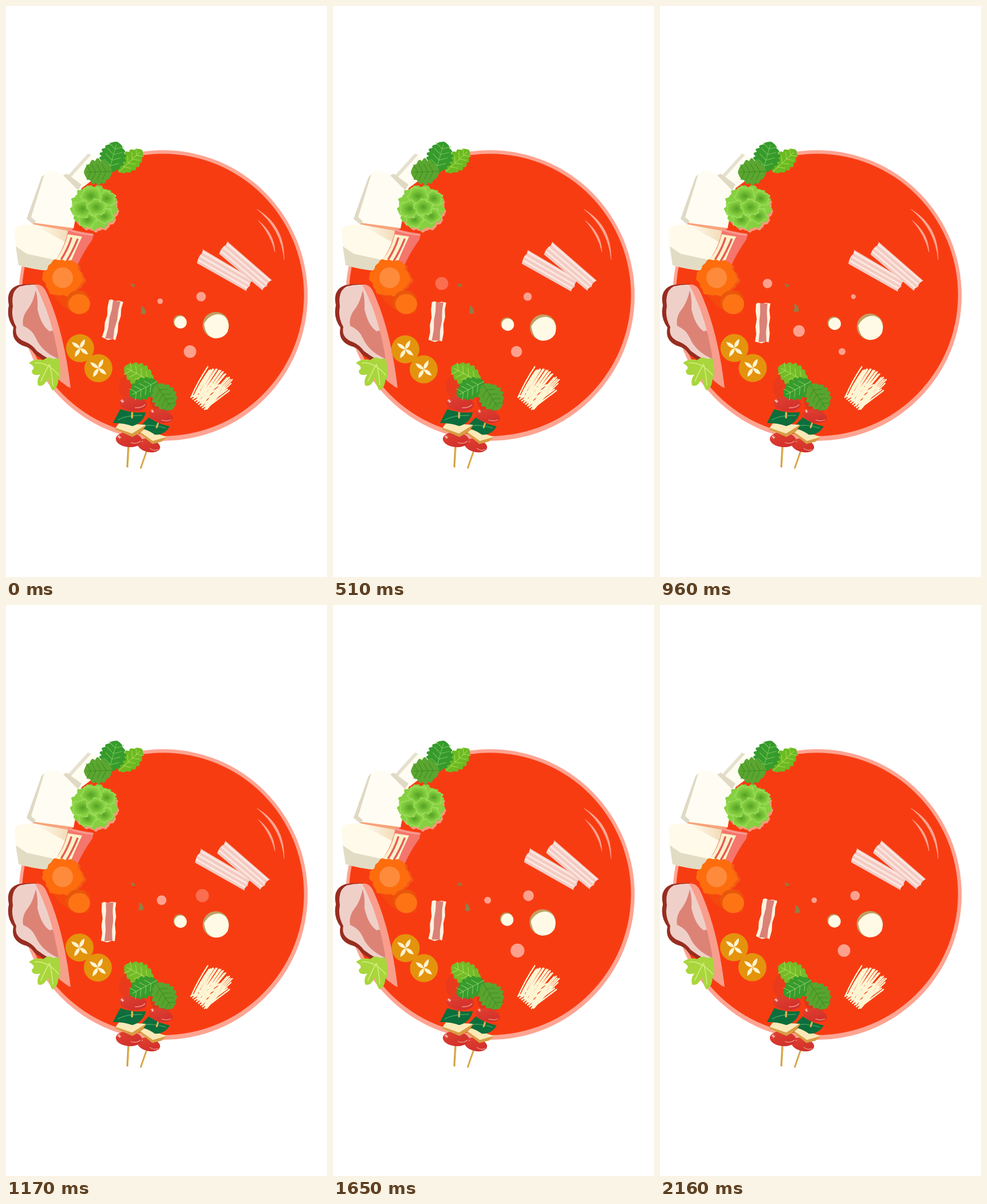
An HTML page for the animation above (2190 ms loop, 561 by 998 pixels).

```html
<!DOCTYPE html>
<html lang="en">
<head>
<meta charset="utf-8">
<title>Hot pot</title>
<style>
html, body { margin: 0; width: 100%; height: 100%; overflow: hidden; background: #fff; }
svg { display: block; width: 100vw; height: 100vh; }
</style>
</head>
<body>
<svg viewBox="0 0 561 998" fill="none" stroke-linejoin="round" stroke-linecap="round">
  <defs>
    <radialGradient id="frill">
      <stop offset="0" stop-color="#559f25"/><stop offset=".55" stop-color="#78c437"/><stop offset="1" stop-color="#92da4e"/>
    </radialGradient>
    <linearGradient id="tomato" x2="1" y2="1">
      <stop offset="0" stop-color="#e2412f"/><stop offset="1" stop-color="#cd2c2b"/>
    </linearGradient>
    <linearGradient id="tan">
      <stop offset="0" stop-color="#fffdf3"/><stop offset="1" stop-color="#f2dbb6"/>
    </linearGradient>
    <path id="petal" d="M0 0Q8-6.500 18 0Q8 6.500 0 0" fill="#fdf3d0"/>
    <g id="cap">
      <circle r="24.500" fill="#e4930d"/>
      <use href="#petal" transform="rotate(38)"/><use href="#petal" transform="rotate(121)"/>
      <use href="#petal" transform="rotate(216)"/><use href="#petal" transform="rotate(298)"/>
    </g>
    <g id="rasher">
      <path d="M0-13Q5-10 2-4Q0 3 4 13L103 12Q100 7 104 2Q100-5 104-12Z" fill="#f3cbc3"/>
      <path d="M2-9.500L102-9M2-1L101-1M3 7L102 6.500" stroke="#fbe8e1" stroke-width="3.200" stroke-linecap="butt"/>
    </g>
  </defs>

  <ellipse cx="274.700" cy="506" rx="252.500" ry="254" fill="#fda492"/>
  <ellipse cx="274.300" cy="505" rx="246.500" ry="246.800" fill="#f83c12"/>
  <path d="M439 355.500Q487 384 486 443Q481 390 439 355.500M441 375Q469 397 470 430Q463 400 441 375" fill="#fda794" stroke="#fda794" stroke-width=".6"/>

  <!-- tofu -->
  <path d="M104 301L143 258L160 264L150 305L130 320Z" fill="#fffdf2"/>
  <path d="M104 301L143 258L149 260L110 303Z" fill="#e6e0ce"/>
  <path d="M74 287L103 295L132 318L118 389L48 381L36 372L62 299Z" fill="#fffdf3"/>
  <path d="M62 299L36 372L48 382L52 376L44 369L67 294Z" fill="#dfd9c5"/>
  <path d="M100 296L106 293L132 312L126 322Z" fill="#e0dac5"/>
  <path d="M49 379L117 388L113 394L48 383Z" fill="#f8a37a"/>
  <path d="M17 386Q30 381 50 382L110 395L104 428L76 463Q45 460 22 453Q17 420 15 395Z" fill="#fffaea"/>
  <path d="M48 382L110 393L106 414Z" fill="url(#tan)"/>
  <path d="M17 420L36 433L82 443L75 463Q45 460 22 453Z" fill="#e2dcc4"/>

  <!-- crab stick -->
  <path d="M109 389Q130 395 153 398L151 408Q135 430 124 455L85 446Q104 420 109 389" fill="#f4766c"/>
  <path d="M108 399L133 403Q120 430 112 451L87 443Q102 425 108 399" fill="#faf2ca"/>
  <path d="M114 406Q108 425 97 442M125 408Q117 428 106 446" stroke="#e95c55" stroke-width="3.500"/>
  <path d="M109 391Q130 398 151 400" stroke="#f99b91" stroke-width="3"/>

  <g id="greens"></g>
  <g id="carrots"></g>

  <!-- meat -->
  <path d="M21 488Q42 484 59 488Q84 540 103 630Q72 626 50 608Q42 596 30 594Q8 585 13 562Q0 545 5 523Q-1 496 21 488" fill="#972d20"/>
  <path d="M24 490Q43 485 59 488Q84 540 102 629Q76 620 54 603Q46 592 34 587Q14 580 18 561Q8 543 12 525Q8 498 24 490" fill="#efd0c9"/>
  <path d="M52 497Q47 519 38 530Q27 544 30 559Q46 566 52 580Q62 604 92 617L88 582Q83 562 77 569Q62 560 55 530Q56 510 52 497" fill="#dc8376"/>
  <path d="M51 487Q64 485 71 501Q101 567 113 668L91 652Q98 640 89 600Q78 538 51 487" fill="#f99d8d"/>
  <path d="M40 624Q51 615 65 619Q73 611 83 617Q95 613 96 624Q102 638 107 655Q96 658 92 650Q91 668 81 672Q74 661 74 650Q65 668 56 663Q53 653 60 644Q45 648 45 637Q54 632 40 624" fill="#a9d63c"/>
  <path d="M92 613Q101 635 110 667L94 655Q97 637 92 613" fill="#f99d8d"/>
  <path d="M51 624Q72 622 92 645M61 656Q70 636 76 626M82 663Q80 642 77 628" stroke="#d6ee83" stroke-width="1.500"/>

  <!-- moving pieces -->
  <g id="bubbles" fill="#fda18e"></g>
  <g id="bacon">
    <use href="#rasher" transform="translate(337 436.500) rotate(30)"/>
    <use href="#rasher" transform="translate(378 421) rotate(40.500)"/>
  </g>
  <path d="M218 485L224 486L226 491L219 490.500Z" fill="#94793f"/>
  <path id="herb" d="M-3-7Q3-5 5 4L4 7L-4 7Q-2 0-3-7" fill="#8f8048"/>
  <g id="pork">
    <path d="M167 521L171 519L177 521L184 519L192 520L190.500 532L192 545L190 558L191.500 573L190 588L185 587L177 590L166 587L168 574L166.500 561L168.500 548L166.500 534Z" fill="#fdf2df"/>
    <path d="M174 521L187 520L186 535L187 552L185 570L186 587L172 588L174 569L173 552L174.500 537Z" fill="#db8177"/>
  </g>
  <g id="smallCap">
    <circle cx="-1" cy="-1" r="11.200" fill="#b99a58"/><circle r="10.800" cx=".6" cy=".6" fill="#fffae6"/>
  </g>
  <g id="bigCap">
    <circle cx="-.5" cy="-1" r="23" fill="#c0a064"/><path d="M-21-3Q-17-12-8-17Q6-24 17-14Q25-3 20 11Q12 23-2 22Q-18 20-21-3" fill="#fffae6"/>
  </g>
  <g id="shiitake">
    <use href="#cap" x="130" y="597.500"/><use href="#cap" x="162" y="632.500"/>
  </g>

  <g id="enoki" stroke="#fdf5d3" stroke-width="2.300"></g>
  <g id="skewers"></g>
</svg>

<script>
const el = id => document.getElementById(id);
const TAU = Math.PI * 2;

const path = (d, fill, extra = '') => `<path d="${d}" fill="${fill}" ${extra}/>`;
const line = (d, color, w) => `<path d="${d}" stroke="${color}" stroke-width="${w}"/>`;
const disc = (x, y, rx, ry, fill, turn = 0) =>
  `<ellipse cx="${x}" cy="${y}" rx="${rx}" ry="${ry}" fill="${fill}" transform="rotate(${turn} ${x} ${y})"/>`;
const poly = pts => 'M' + pts.map(p => p.map(v => v.toFixed(1)).join(' ')).join('L') + 'Z';

// Closed outline whose radius ripples
function ripple(x, y, rx, ry, waves, depth, phase = 0) {
  const pts = [];
  for (let i = 0; i < 140; i++) {
    const a = i / 140 * TAU;
    const k = 1 + depth * (Math.sin(a * waves + phase) + .5 * Math.sin(a * (waves * 2 + 3)));
    pts.push([x + rx * k * Math.cos(a), y + ry * k * Math.sin(a)]);
  }
  return poly(pts);
}

// Scalloped leaf growing from its stem at (x, y)
function leaf(x, y, angle, len, half, teeth, fill, vein) {
  const side = s => Array.from({ length: 61 }, (_, i) => {
    const u = i / 60, tooth = Math.abs(Math.sin(u * teeth * Math.PI));
    return [u * len, s * half * Math.pow(Math.sin(Math.PI * u), .65) * (.8 + .2 * tooth)];
  });
  let veins = `M0 0L${len * .9} 0`;
  for (let u = .22; u < .8; u += .18)
    for (const s of [-1, 1])
      veins += `M${len * u} 0L${len * (u + .14)} ${s * half * .55}`;
  return `<g transform="translate(${x} ${y}) rotate(${angle})">` +
    path(poly([...side(1), ...side(-1).reverse()]), fill) + line(veins, vein, 1) + '</g>';
}

function lettuce() {
  const puffs = [[172, 366, 15], [142, 374, 15], [176, 337, 15], [149, 331, 17], [133, 355, 17], [158, 352, 16]];
  return path(ripple(157, 356, 39, 38, 13, .04), '#f49a7d') +
    path(ripple(154, 352, 40, 38, 13, .05), '#86d041') +
    puffs.map(([x, y, r], i) =>
      path(ripple(x, y, r, r * .85, 5, .13, i * 2), 'url(#frill)', 'stroke="#b0e672" stroke-width=".9"')).join('');
}

el('greens').innerHTML =
  leaf(197, 290, -43, 56, 18, 6, '#6cba22', '#a5dc55') +
  leaf(179, 291, -74, 56, 24, 7, '#369b2c', '#7cc65a') +
  leaf(186, 289, 178, 50, 24, 5, '#5aa630', '#3f8a24') +
  lettuce();

el('carrots').innerHTML =
  path('M83 505Q100 492 138 498L147 508L145 537Q105 541 83 505', '#f5480c') +
  path(ripple(104, 477, 33, 31, 6, .07, 1), '#f35a15') +
  path(ripple(99, 475, 34, 32, 6, .06, 1), '#fd6d0d') +
  disc(99, 475, 18, 18, '#fe8b3c') +
  disc(125, 517, 20, 20, '#e9570b') + disc(128, 521, 19, 17.5, '#fe7415');

// Loose stems fan upwards, shorter ones cross the lower half
let seed = 7;
const rand = () => (seed = seed * 16807 % 2147483647) / 2147483647;
let stems = '';
for (let i = 0; i < 22; i++) {
  const u = i / 21;
  const x1 = 324 + u * 25 + rand() * 4, y1 = 680 + u * 23 + rand() * 3;
  const x2 = 352 + u * 43 + rand() * 2, y2 = 628 + u * u * 24 + rand() * 12;
  stems += `M${x1} ${y1}Q${(x1 + x2) / 2 - 3} ${(y1 + y2) / 2} ${x2} ${y2}`;
}
for (let i = 0; i < 8; i++)
  stems += `M${323 + i * 3.4} ${684 + i * 3}L${366 + i * 3.5} ${658 + i * 2}`;
el('enoki').innerHTML = `<path d="${stems}"/>`;

const bread = (x, y) =>
  path(`M${x - 27} ${y}L${x - 22} ${y - 10}L${x + 27} ${y - 9}L${x + 20} ${y + 2}L${x + 4} ${y + 12}Z`, '#d99c45') +
  path(`M${x - 26} ${y - 3}L${x - 20} ${y - 11}L${x + 27} ${y - 10}L${x + 3} ${y + 6}Z`, '#fbe9b8');
const pepper = (x, y) =>
  path(`M${x - 29} ${y + 10}Q${x - 22} ${y - 5} ${x - 17} ${y - 15}Q${x + 5} ${y - 8} ${x + 28} ${y - 11}Q${x + 23} ${y + 9} ${x + 5} ${y + 14}Q${x - 10} ${y + 9} ${x - 29} ${y + 10}`, '#0c6e3c') +
  line(`M${x - 20} ${y + 4}Q${x - 6} ${y - 5} ${x + 21} ${y - 5}`, '#3b9b5a', 1.8);
const shine = (x, y) => line(`M${x - 3} ${y}h6M${x} ${y - 3}v6M${x - 2} ${y - 2}l4 4`, '#fbd0c4', 1);

const skewer = (x, y, size, tilt) => `<g transform="translate(${x} ${y}) rotate(${tilt}) scale(${size})">` +
  line('M0 58L-1 108', '#d09a3c', 3.4) + line('M1 60L0 107', '#f0cd7c', 1) +
  disc(0, 61, 23, 13, 'url(#tomato)', 4 - tilt / 2) + line('M4 66Q14 69 20 63', '#f09383', 1.5) + shine(-17, 57) +
  bread(2, 44) + pepper(0, 23) + line('M4 14V22', '#e2b158', 3.5) +
  disc(5, -2, 24, 13, 'url(#tomato)', 4 - tilt / 2) + line('M9 5Q20 5 26-1', '#f09383', 1.5) + shine(-14, -6) +
  '</g>';

el('skewers').innerHTML =
  disc(222, 666, 25, 25, '#e93b1b') + disc(274, 690, 22, 21, '#df351c') +
  skewer(266, 717, .88, 18) + skewer(217, 697, 1, 2) +
  leaf(258, 658, 208, 58, 21, 6, '#74bb28', '#aadd5b') +
  leaf(264, 656, 152, 54, 20, 6, '#379c2d', '#8ccc68') +
  leaf(262, 661, 57, 53, 23, 6, '#58a42f', '#3f8a24');

// Bubbles: left anchor, y, final radius, birth time
const bubbles = [
  [215.3, 429, 18.2, 90], [293.2, 479, 12.3, 150], [266, 516, 14.4, 510], [335, 508, 12.5, 390],
  [313.8, 604, 14.6, 360], [182, 485, 12.4, 270], [235.6, 568, 12.3, 210]
];
el('bubbles').innerHTML = bubbles.map(([, y]) => `<circle cy="${y}"/>`).join('');
const dots = [...el('bubbles').children];

const LOOP = 2190, STEP = 30, CYCLE = 2160, PULSE = 540, LIFE = 270;
const swing = (t, peak, period = CYCLE) => Math.cos((t - peak) / period * TAU);
const move = (id, x, y, more = '') => el(id).setAttribute('transform', `translate(${x} ${y}) ${more}`);

function draw(t) {
  bubbles.forEach(([x, , size, birth], i) => {
    const p = ((t - birth) % PULSE + PULSE) % PULSE / LIFE;
    const r = p > 0 && p < 1 ? size * (.25 + .75 * p) : 0;
    dots[i].setAttribute('r', r);
    dots[i].setAttribute('cx', x + .71 * r);
    dots[i].setAttribute('opacity', Math.max(0, Math.min(1, (1 - p) / .22)));
  });
  const b = swing(t, 1900);
  move('bacon', -2.2 + 2.8 * b, .3 - .6 * b);
  move('herb', 238 + 4 * swing(t, 400), 529 + 2.7 * swing(t, 180));
  const k = Math.pow(Math.abs(1 - t / 1080), 1.25);
  move('pork', k, -6 * k, `rotate(${10 * k} 179 590)`);
  const bob = swing(t, 610);
  move('smallCap', 304.5 + .5 * bob, 553 + 3.5 * bob);
  move('bigCap', 367.3 + .4 * bob, 559.4 + 3.8 * bob);
  const s = swing(t, 940, 1080);
  move('shiitake', -1.9 + 2 * s, 1.5 - 1.3 * s);
}

const start = performance.now();
function tick() {
  const t = (performance.now() - start) % LOOP;
  draw(Math.floor(t / STEP) * STEP);
  requestAnimationFrame(tick);
}
tick();
</script>
</body>
</html>
```
